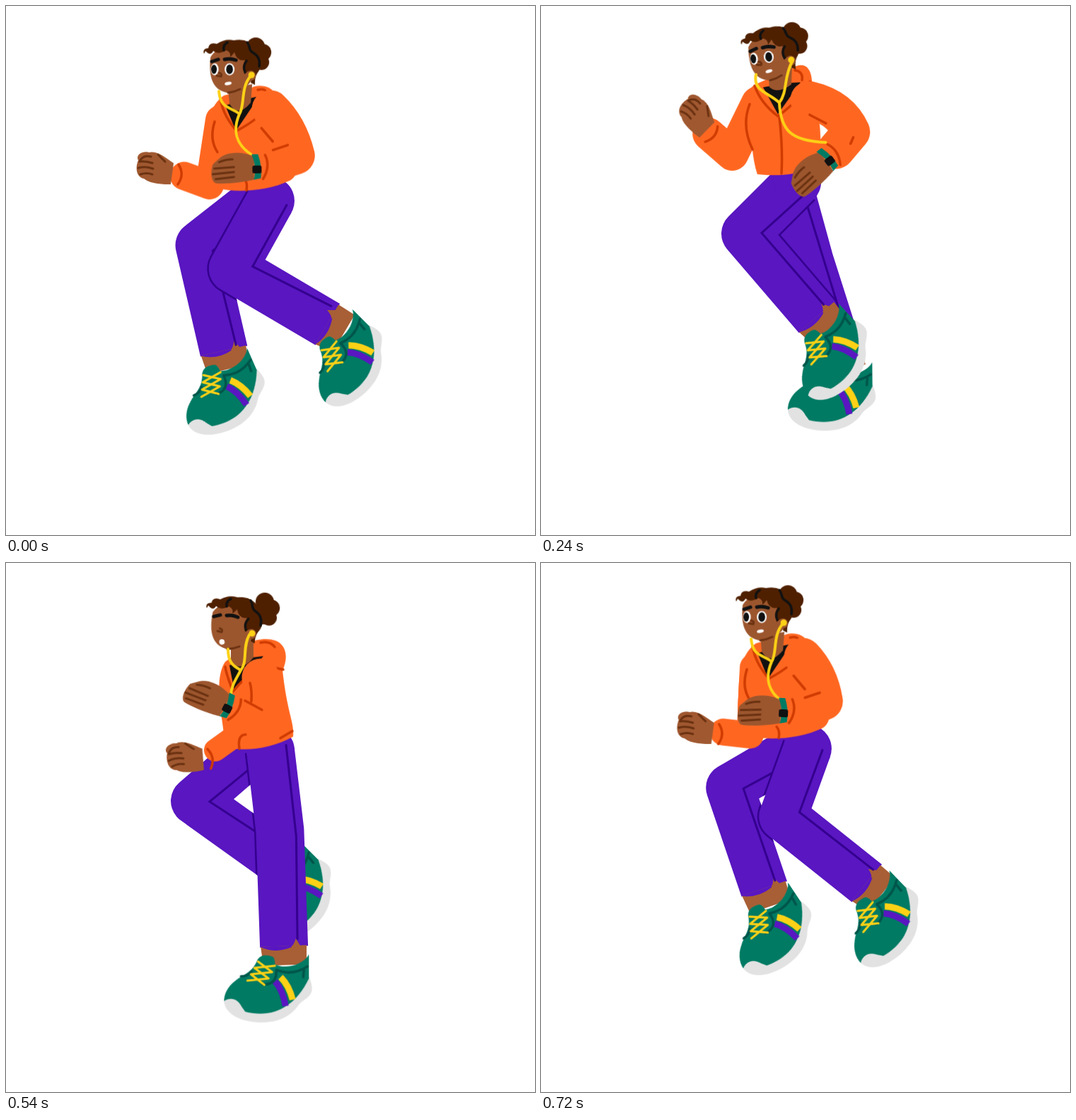
These frames come from a looping animation (748 by 748 pixels, 750 ms). An HTML page without scripts:

```html
<!DOCTYPE html>
<html lang="en">
<head>
<meta charset="utf-8">
<title>Runner</title>
<style>
html, body { margin: 0; height: 100%; overflow: hidden; background: #fff }
svg { display: block; width: 100vw; height: 100vh }
path { fill: none; stroke-linecap: round; stroke-linejoin: round }

[class] { animation: .75s linear infinite }
.far-leg { animation-name: far-leg }
.near-leg { animation-name: near-leg }
.far-seam { animation-name: far-seam }
.near-seam { animation-name: near-seam }
.far-shoe { animation-name: far-shoe }
.near-shoe { animation-name: near-shoe }
.bob { animation-name: bob }
.far-arm { animation-name: far-arm }
.near-arm { animation-name: near-arm }
.far-hand { animation-name: far-hand }
.near-hand { animation-name: near-hand }
.torso { animation-name: torso }
.shirt { animation-name: shirt }
.neck { animation-name: neck }
.collar { animation-name: collar }
.folds { animation-name: folds }
.cord { animation-name: cord }
.head { animation-name: head; transform-origin: 325px 98px }
.bun { animation-name: bun }
.eyes { animation-name: eyes; transform-box: fill-box; transform-origin: center }
.mouth { animation-name: mouth }

.far-leg, .near-leg { stroke: #5916c1; stroke-width: 68; stroke-linecap: butt }
.cloth { marker-start: url(#hip); marker-end: url(#hem) }
.outline { stroke: #35008f; stroke-width: 73 }
.mask { stroke: #fff }
.far-seam, .near-seam { stroke: #35008f; stroke-width: 3; stroke-linejoin: miter }
.far-arm, .near-arm { stroke: #ff6721 }
.near-arm { stroke-width: 53 }
.torso { fill: #ff6721 }
.shirt { fill: #111 }
.neck { fill: #9c562e }
.fold, .collar, .folds { stroke: #cf3b00; stroke-width: 3.5 }
.cord { stroke: #fdd116; stroke-width: 4 }
.crease { stroke: #6b3211; stroke-width: 3 }

@keyframes far-leg {
  0%, to { d: path("M360,270L273,337L308,487") }
  10% { d: path("M354,308L312,430L318,574") }
  20% { d: path("M347,290L349,415L345,538") }
  32% { d: path("M352,260L380,360L421,492") }
  38% { d: path("M355,242L360,352L440,462") }
  48% { d: path("M366,262L298,360L385,418") }
  60% { d: path("M362,305L276,385L408,462") }
  72% { d: path("M350,265L267,337L390,424") }
  80% { d: path("M354,242L268,302L358,423") }
  86% { d: path("M357,241L266,300L340,432") }
  96% { d: path("M362,262L267,317L316,460") }
}
@keyframes near-leg {
  0%, to { d: path("M374,275L321,371L455,450") }
  10% { d: path("M370,308L303,395L444,470") }
  20% { d: path("M364,286L287,355L419,438") }
  32% { d: path("M362,249L289,322L391,440") }
  38% { d: path("M366,241L290,317L371,448") }
  48% { d: path("M370,264L300,341L357,480") }
  60% { d: path("M372,308L345,430L352,574") }
  72% { d: path("M374,265L387,378L392,543") }
  80% { d: path("M372,245L410,360L458,512") }
  86% { d: path("M375,240L390,352L475,480") }
  96% { d: path("M377,262L343,358L461,453") }
}
@keyframes far-seam {
  0%, to { d: path("M370,283L292,345L325,478") }
  10% { d: path("M371,308L330,428L335,565") }
  20% { d: path("M366,300L368,410L365,526") }
  32% { d: path("M372,268L398,352L437,482") }
  38% { d: path("M372,244L382,348L450,448") }
  48% { d: path("M378,272L330,362L391,404") }
  60% { d: path("M372,318L306,382L414,445") }
  72% { d: path("M361,278L288,338L398,409") }
  80% { d: path("M362,256L287,304L370,402") }
  86% { d: path("M366,254L286,303L352,418") }
  96% { d: path("M372,272L286,318L331,448") }
}
@keyframes near-seam {
  0%, to { d: path("M397,281L349,368L460,424") }
  10% { d: path("M387,318L331,392L449,453") }
  20% { d: path("M380,299L320,351L426,420") }
  32% { d: path("M376,263L312,321L400,422") }
  38% { d: path("M380,254L313,319L384,437") }
  48% { d: path("M390,272L320,347L371,464") }
  60% { d: path("M389,308L363,428L369,562") }
  72% { d: path("M396,258L410,387L411,532") }
  80% { d: path("M397,232L432,360L474,498") }
  86% { d: path("M395,240L413,350L488,462") }
  96% { d: path("M398,264L366,352L470,434") }
}
@keyframes far-shoe {
  0%, to { transform: translate(312px,504px) rotate(-24deg) }
  10% { transform: translate(322px,592px) rotate(-4deg) }
  20% { transform: translate(346px,553px) rotate(0deg) }
  32% { transform: translate(433px,513px) rotate(0deg) }
  38% { transform: translate(452px,474px) rotate(-22deg) }
  48% { transform: translate(421px,441px) rotate(-46deg) }
  60% { transform: translate(422px,471px) rotate(-45deg) }
  72% { transform: translate(399px,426px) rotate(-45deg) }
  80% { transform: translate(372px,436px) rotate(-47deg) }
  86% { transform: translate(350px,447px) rotate(-42deg) }
  96% { transform: translate(325px,477px) rotate(-34deg) }
}
@keyframes near-shoe {
  0%, to { transform: translate(471px,459px) rotate(-45deg) }
  10% { transform: translate(459px,478px) rotate(-44deg) }
  20% { transform: translate(434px,446px) rotate(-46deg) }
  32% { transform: translate(401px,450px) rotate(-43deg) }
  38% { transform: translate(381px,462px) rotate(-35deg) }
  48% { transform: translate(364px,495px) rotate(-23deg) }
  60% { transform: translate(352px,591px) rotate(-4deg) }
  72% { transform: translate(392px,562px) rotate(0deg) }
  80% { transform: translate(469px,531px) rotate(0deg) }
  86% { transform: translate(484px,492px) rotate(-22deg) }
  96% { transform: translate(473px,465px) rotate(-44deg) }
}
@keyframes bob {
  0%, to { transform: none }
  10% { transform: translate(0,38px) }
  20% { transform: translate(0,14px) }
  32% { transform: translate(-7px,-25px) }
  38% { transform: translate(-4px,-31px) }
  48% { transform: translate(0,-4px) }
  60% { transform: translate(0,40px) }
  72% { transform: none }
  80% { transform: translate(-4px,-26px) }
  86% { transform: translate(-5px,-32px) }
  96% { transform: translate(-4px,-13px) }
}
@keyframes far-arm {
  0%, to { d: path("M302,160L288,253L252,240"); stroke-width: 40 }
  20%, 32% { d: path("M313,162L277,235L244,206"); stroke-width: 46 }
  48% { d: path("M306,160L298,243L262,228"); stroke-width: 40 }
  72%, 80% { d: path("M328,170L335,237L296,265"); stroke-width: 32 }
  96% { d: path("M304,160L300,256L262,252"); stroke-width: 38 }
}
@keyframes near-arm {
  0%, to { d: path("M374,145Q400,170 410,211L382,220") }
  20%, 32% { d: path("M386,158Q430,168 446,203L424,229") }
  48% { d: path("M374,145Q398,170 408,212L386,226") }
  72%, 80% { d: path("M360,162Q368,180 368,200L344,210") }
  96% { d: path("M374,145Q398,170 404,208L376,220") }
}
@keyframes far-hand {
  0%, to { transform: translate(235px,238px) rotate(0deg) }
  20% { transform: translate(230px,194px) rotate(37deg) }
  32% { transform: translate(241px,201px) rotate(37deg) }
  48% { transform: translate(249px,220px) rotate(13deg) }
  72%, 80% { transform: translate(279px,279px) rotate(-12deg) }
  96% { transform: translate(247px,255px) rotate(0deg) }
}
@keyframes near-hand {
  0%, to { transform: translate(348px,228px) rotate(0deg) }
  20%, 32% { transform: translate(409px,246px) rotate(-37deg) }
  48% { transform: translate(350px,241px) rotate(-8deg) }
  72% { transform: translate(308px,201px) rotate(27deg) }
  80% { transform: translate(313px,205px) rotate(27deg) }
  96% { transform: translate(340px,222px) rotate(3deg) }
}
@keyframes torso {
  0%, 48%, 96%, to { d: path("M308,126C288,140 284,165 283,200C281,220 283,235 284,250C300,264 360,266 402,246C425,235 412,150 380,126C378,110 352,110 346,116Z") }
  20%, 32% { d: path("M310,136C298,142 290,165 300,190C306,212 305,240 313,263C340,266 370,264 390,254C406,232 406,205 390,130C388,108 376,104 360,114Z") }
  72%, 80% { d: path("M310,140C302,152 300,170 302,200C306,225 308,240 310,258C325,268 370,266 406,246C408,225 398,215 391,152C402,130 396,100 352,110Z") }
}
@keyframes shirt {
  0%, 48%, 96%, to { d: path("M310,140L325,176L358,127L344,130Z") }
  20%, 32% { d: path("M321,140L342,178L374,133L356,134Z") }
  72%, 80% { d: path("M316,145L323,182L364,132L348,134Z") }
}
@keyframes neck {
  0%, 48%, 96%, to { d: path("M314,116L348,110L346,136Q328,158 316,138Z") }
  20%, 32% { d: path("M328,118L362,112L361,136Q342,150 330,140Z") }
  72%, 80% { d: path("M318,116L350,108L350,134Q332,156 318,140Z") }
}
@keyframes collar {
  0%, 48%, 96%, to { d: path("M303,130C306,150 316,164 326,176C345,166 372,148 379,128M356,118Q369,115 367,124") }
  20%, 32% { d: path("M309,138C316,158 330,172 342,181C362,166 378,150 387,132M366,116Q378,118 376,130") }
  72%, 80% { d: path("M310,147C312,160 316,168 321,182C340,158 360,143 392,151M360,113Q373,110 380,119") }
}
@keyframes folds {
  0%, 48%, 96%, to { d: path("M295,163Q287,188 299,206M361,172L377,191M377,203L398,196M337,244Q342,250 340,260") }
  20%, 32% { d: path("M302,164Q290,195 306,228M387,179L410,191M449,211L445,220M344,182Q349,225 347,262") }
  72%, 80% { d: path("M345,170Q348,180 347,196M338,195L362,208M388,248L405,238M339,243Q327,243 330,263") }
}
@keyframes cord {
  0%, 48%, 96%, to { d: path("M301,120C303,145 318,142 330,152C338,140 331,115 346,98M330,152C320,175 325,195 346,209") }
  20% { d: path("M311,116C306,144 328,148 341,162C355,146 350,126 368,104M341,162C338,201 350,214 406,221") }
  32% { d: path("M311,122C306,146 330,148 344,162C356,146 350,126 362,104M344,162C346,201 360,216 410,218") }
  72%, 80% { d: path("M314,122C314,142 322,146 332,152C342,140 334,120 344,102M332,152C325,165 318,175 318,188") }
}
@keyframes head {
  0%, 48%, 96%, to { transform: translate(0,0) rotate(0deg) }
  20% { transform: translate(19px,4px) rotate(-1deg) }
  32%, 38% { transform: translate(14px,7px) rotate(-7deg) }
  72%, 80% { transform: translate(1px,1px) rotate(5deg) }
}
@keyframes bun {
  0%, 48%, 96%, to { transform: none }
  72%, 80% { transform: translate(8px,-6px) }
}
@keyframes eyes {
  0%, 62%, 92%, to { transform: none }
  72%, 83% { transform: scaleY(0) }
}
@keyframes mouth {
  0%, 32%, 94%, to { cx: 314px; cy: 109px; rx: 5px; ry: 2.3px }
  48% { cx: 301px; cy: 106px; rx: 3.5px; ry: 5.5px }
  72%, 80% { cx: 305px; cy: 111px; rx: 3.8px; ry: 3.8px }
}
</style>
</head>
<body>
<svg viewBox="0 0 748 748">
<defs>
  <marker id="hip" markerUnits="userSpaceOnUse" markerWidth="68" markerHeight="68" refX="34" refY="34">
    <circle cx="34" cy="34" r="34" fill="#5916c1"/>
  </marker>
  <marker id="hem" markerUnits="userSpaceOnUse" markerWidth="1" markerHeight="1" orient="auto" overflow="visible">
    <path d="M-1,-32L26,-31V30L-1,33Z" style="fill:#a85f35"/>
    <path d="M-1,34Q10,12 1,-11H-1Z" style="fill:#5916c1"/>
    <path d="M1,-24Q-6,-20 -11,-17Q-4,-15 1,-10Z" style="fill:#a85f35"/>
  </marker>
  <mask id="behind" maskUnits="userSpaceOnUse" width="748" height="748">
    <path class="far-leg mask"/>
  </mask>
  <g id="shoe">
    <path d="M-85,58C-84,74 -66,86 -38,88C-5,90 12,76 20,64C28,54 42,52 39,36C38,30 36,26 34,20L-60,40Z" style="fill:#e2e2e2"/>
    <path d="M-38,0C-45,18 -58,20 -70,30C-80,38 -85,48 -85,58C-76,52 -66,54 -60,66L-55,73C-20,82 14,70 35,26L35,-8C26,8 0,13 -13,6Q-13,-4 -17,-5C-24,-8 -34,-8 -38,0Z" style="fill:#007a63"/>
    <path d="M-13,30Q-2,42 2,65" stroke="#5916c1" stroke-width="9" style="stroke-linecap:butt"/>
    <path d="M-5,24Q7,36 12,56" stroke="#fdd116" stroke-width="9" style="stroke-linecap:butt"/>
    <path d="M33,9C16,20 2,19 -11,14Q-10,36 -31,34M28,13L27,24M-46,16Q-51,23 -61,23" stroke="#00554a" stroke-width="3.5"/>
    <path d="M-37,2L-17,17M-13,8L-42,11M-42,11L-22,26M-17,17L-47,20M-47,20L-28,35M-22,26L-52,29" stroke="#fdd116" stroke-width="3"/>
  </g>
</defs>

<path class="far-leg cloth"/>
<path class="far-seam"/>
<g class="far-shoe"><use href="#shoe"/></g>

<g mask="url(#behind)"><path class="near-leg outline"/></g>
<path class="near-leg cloth"/>
<path class="near-seam"/>
<g class="near-shoe"><use href="#shoe"/></g>

<g class="bob">
  <path class="far-arm"/>
  <g class="far-hand">
    <path d="M2,-16C-8,-22 -20,-34 -32,-31C-44,-34 -52,-26 -48,-20C-53,-8 -50,4 -40,6C-30,14 -12,14 -2,14Z" style="fill:#a05830"/>
    <path class="crease" d="M-30,-25Q-42,-28 -46,-18Q-38,-19 -28,-16M-48,-9Q-38,-12 -27,-8M-45,0Q-36,-3 -28,0M-20,-28L-10,-18"/>
    <path class="fold" d="M9,-14Q18,0 8,14"/>
  </g>
  <path class="torso"/>
  <path class="shirt"/>
  <path class="neck"/>
  <path class="collar"/>
  <path class="near-arm"/>
  <path class="folds"/>
  <g class="head">
    <g class="bun" fill="#4f2000">
      <circle cx="353" cy="57" r="13"/>
      <circle cx="363" cy="65" r="12"/>
      <circle cx="361" cy="79" r="11"/>
      <circle cx="352" cy="73" r="16"/>
    </g>
    <path d="M289,72C286,100 292,118 312,122C330,124 346,112 352,95L350,66C330,52 300,52 289,72Z" style="fill:#9c562e"/>
    <path d="M280,67Q277,60 286,59Q287,50 298,53Q310,45 322,48Q342,44 354,60Q366,76 357,92Q351,99 352,111L346,108Q348,98 342,92L337,96Q333,84 338,76Q326,78 323,65L317,72Q318,64 311,62Q300,69 293,63Q289,71 282,63Z" style="fill:#4f2000"/>
    <path d="M341,51C346,57 342,62 350,66Q360,72 358,85M313,51Q306,55 308,62M340,77Q334,85 338,93" stroke="#111" stroke-width="3.5"/>
    <path d="M291,78L300,75M309,75Q317,73 325,76" stroke="#111" stroke-width="5"/>
    <g class="eyes">
      <ellipse cx="295" cy="89" rx="5.5" ry="8.5" fill="#fff"/>
      <ellipse cx="316" cy="89" rx="7" ry="8.5" fill="#fff"/>
      <ellipse cx="294" cy="89" rx="4" ry="6.5" fill="#111"/>
      <ellipse cx="316" cy="89" rx="4.8" ry="6.8" fill="#111"/>
    </g>
    <path class="crease" d="M301,94Q306,95 304,99L298,98M314,122Q323,121 331,117"/>
    <ellipse class="mouth" fill="#fff" transform="rotate(-12 314 109)"/>
    <circle cx="346" cy="98" r="7" fill="#9c562e"/>
    <circle cx="347" cy="97" r="4.5" fill="#fdd116"/>
  </g>
  <path class="cord"/>
  <g class="near-hand">
    <path d="M2,-16C-20,-26 -40,-20 -46,-14L-56,-5C-60,8 -58,22 -50,22C-30,23 -12,20 2,17Z" style="fill:#9c562e"/>
    <path class="crease" d="M-47,-8Q-38,-12 -28,-12M-54,1L-26,-1M-56,9L-26,6M-52,16L-26,13"/>
    <path d="M-1,-19H8Q14,-2 12,15L2,17Q6,-2 -1,-19Z" style="fill:#007a63"/>
    <rect y="-3" width="13" height="11" rx="2.5" fill="#111"/>
    <path class="fold" d="M18,-18Q26,-2 15,16"/>
  </g>
</g>
</svg>
</body>
</html>
```
